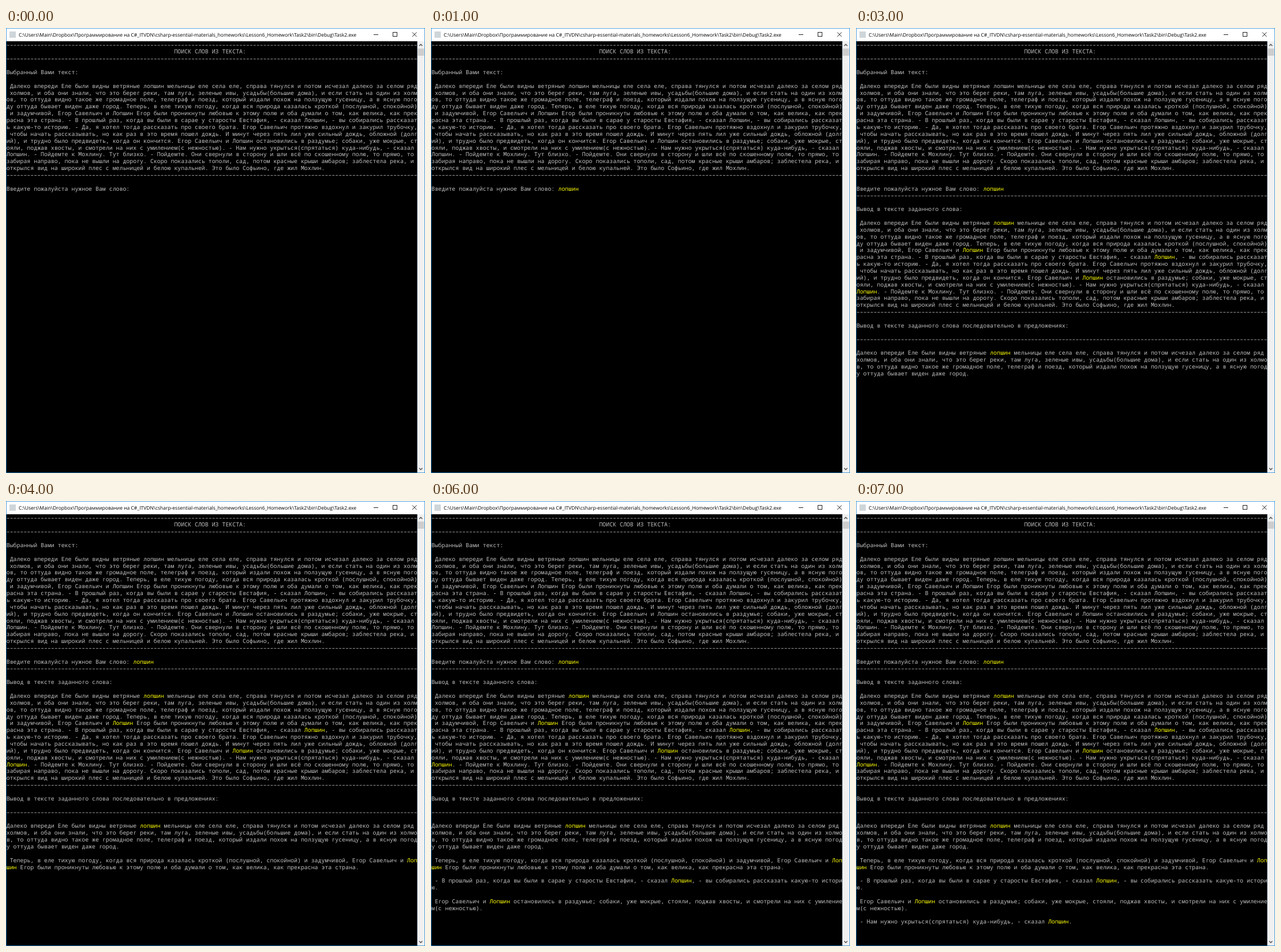
Animation of 726 by 771 pixels, one loop 8000 ms. Source, as an HTML page with a canvas:

```html
<!DOCTYPE html>
<html lang="ru">
<head>
<meta charset="utf-8">
<title>Поиск слов</title>
<style>
html, body { margin: 0; width: 726px; height: 771px; overflow: hidden; background: #000; }
canvas { display: block; }
</style>
</head>
<body>
<canvas id="stage" width="726" height="771"></canvas>
<script>
const W = 726, H = 771, LOOP = 8000, STEP = 1000;
const EDGE = 0.74, TOP = 22.98, SCROLL_X = 712.7;
const COLS = 120, CELL_W = 5.932, CELL_H = 11.861;
const BASELINE = TOP + 9.63, RULE_Y = TOP + 7.04;
const GRAY = '#c0c0c0', YELLOW = '#ffff00';
const WORD = 'лопшин';
const PATH = 'C:\\Users\\Main\\Dropbox\\Программирование на C#_ITVDN\\csharp-essential-materials_homeworks\\Lesson6_Homework\\Task2\\bin\\Debug\\Task2.exe';
const STORY = [
  ' Далеко впереди Еле были видны ветряные лопшин мельницы еле села еле, справа тянулся и потом исчезал далеко за селом ряд',
  ' холмов, и оба они знали, что это берег реки, там луга, зеленые ивы, усадьбы(большие дома), и если стать на один из холм',
  'ов, то оттуда видно такое же громадное поле, телеграф и поезд, который издали похож на ползущую гусеницу, а в ясную пого',
  'ду оттуда бывает виден даже город. Теперь, в еле тихую погоду, когда вся природа казалась кроткой (послушной, спокойной)',
  ' и задумчивой, Егор Савельич и Лопшин Егор были проникнуты любовью к этому полю и оба думали о том, как велика, как прек',
  'расна эта страна. - В прошлый раз, когда вы были в сарае у старосты Евстафия, - сказал Лопшин, - вы собирались рассказат',
  'ь какую-то историю. - Да, я хотел тогда рассказать про своего брата. Егор Савельич протяжно вздохнул и закурил трубочку,',
  ' чтобы начать рассказывать, но как раз в это время пошел дождь. И минут через пять лил уже сильный дождь, обложной (долг',
  'ий), и трудно было предвидеть, когда он кончится. Егор Савельич и Лопшин остановились в раздумье; собаки, уже мокрые, ст',
  'ояли, поджав хвосты, и смотрели на них с умилением(с нежностью). - Нам нужно укрыться(спрятаться) куда-нибудь, - сказал ',
  'Лопшин. - Пойдемте к Мохлину. Тут близко. - Пойдемте. Они свернули в сторону и шли всё по скошенному полю, то прямо, то ',
  'забирая направо, пока не вышли на дорогу. Скоро показались тополи, сад, потом красные крыши амбаров; заблестела река, и ',
  'открылся вид на широкий плес с мельницей и белою купальней. Это было Софьино, где жил Мохлин.'
].join('');
const MATCHES = STORY.match(/[^.]+\./g)
  .filter(s => s.toLowerCase().includes(WORD))
  .map((s, i) => i ? s : s.trim());

const ctx = document.getElementById('stage').getContext('2d');

function rect(x, y, right, bottom, color) {
  ctx.fillStyle = color;
  ctx.fillRect(x, y, right - x, bottom - y);
}

function stroke(points, color, width) {
  ctx.strokeStyle = color;
  ctx.lineWidth = width;
  ctx.beginPath();
  points.forEach(([x, y], i) => i ? ctx.lineTo(x, y) : ctx.moveTo(x, y));
  ctx.stroke();
}

// Prints on the console grid and returns the next free row.
function print(row, text, { col = 0, mark = false } = {}) {
  const hits = mark ? [...text.toLowerCase().matchAll(new RegExp(WORD, 'g'))].map(m => m.index) : [];
  for (let i = 0; i < text.length; i++) {
    if (text[i] === ' ') continue;
    const cell = col + i;
    const hit = hits.some(h => i >= h && i < h + WORD.length);
    ctx.fillStyle = hit ? YELLOW : GRAY;
    ctx.fillText(text[i], EDGE + cell % COLS * CELL_W,
      BASELINE + (row + Math.floor(cell / COLS)) * CELL_H);
  }
  return row + Math.ceil((col + text.length) / COLS);
}

// One dash per console cell, across the whole row.
function rule(row) {
  const y = RULE_Y + row * CELL_H, dash = CELL_W * 0.68;
  const x = EDGE + (CELL_W - dash) / 2;
  ctx.setLineDash([dash, CELL_W - dash]);
  stroke([[x, y], [SCROLL_X, y]], GRAY, 0.8);
  ctx.setLineDash([]);
}

function drawWindow() {
  const right = W - EDGE, bottom = H - EDGE;
  rect(0, 0, W, H, '#1883d7');
  rect(EDGE, EDGE, right, TOP, '#ffffff');
  rect(EDGE, TOP, SCROLL_X, bottom, '#000000');
  rect(SCROLL_X, TOP, right, bottom, '#f0f0f0');
  rect(713.4, 35.6, 724.6, 48, '#cdcdcd');
  rect(6, 6, 17, 17, '#cfd6da');

  ctx.font = '8.49px "Open Sans", "Noto Sans", sans-serif';
  ctx.fillStyle = '#000000';
  ctx.fillText(PATH, 22, 15);

  stroke([[637, 11.5], [645, 11.5]], '#222222', 1);
  ctx.strokeRect(670.5, 7.5, 7, 7);
  stroke([[704, 7.5], [711.5, 15]], '#222222', 1);
  stroke([[711.5, 7.5], [704, 15]], '#222222', 1);
  stroke([[716, 31], [718.7, 28.3], [721.4, 31]], '#505050', 1.4);
  stroke([[716, 762.5], [718.7, 765.2], [721.4, 762.5]], '#505050', 1.4);
}

function draw(step) {
  ctx.textRendering = 'geometricPrecision';
  drawWindow();
  ctx.font = '500 9.88px "Noto Sans Mono", "DejaVu Sans Mono", monospace';

  rule(0);
  print(1, 'ПОИСК СЛОВ ИЗ ТЕКСТА:', { col: 49 });
  rule(2);
  print(4, 'Выбранный Вами текст:');
  rule(print(6, STORY));
  const prompt = 'Введите пожалуйста нужное Вам слово: ';
  print(21, prompt);
  if (step >= 1) print(21, WORD, { col: prompt.length, mark: true });
  if (step < 2) return;

  rule(22);
  print(24, 'Вывод в тексте заданного слова:');
  rule(print(26, STORY, { mark: true }));
  print(41, 'Вывод в тексте заданного слова последовательно в предложениях:');
  rule(43);

  let row = 45;
  for (const sentence of MATCHES.slice(0, step - 2)) {
    row = print(row, sentence, { mark: true }) + 1;
  }
}

let shown = -1;
function tick() {
  const step = Math.floor(performance.now() % LOOP / STEP);
  if (step !== shown) draw(shown = step);
  requestAnimationFrame(tick);
}
tick();
</script>
</body>
</html>
```
